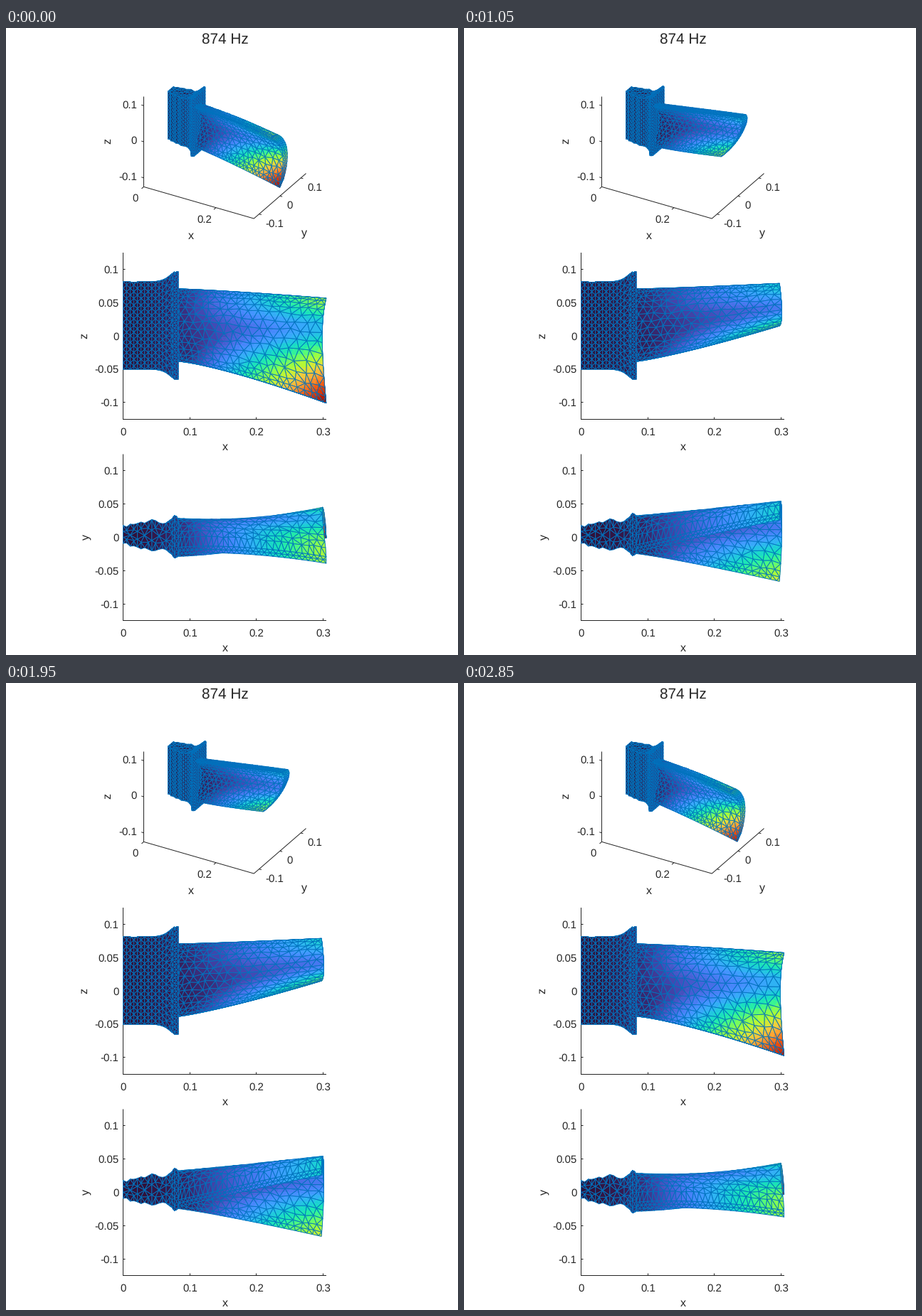
Animation, 635 px wide and 882 px high, one loop 3000 ms. Source, as a matplotlib script:

```python
import numpy as np
import matplotlib.pyplot as plt
from matplotlib.animation import FuncAnimation
from matplotlib.collections import PolyCollection
from matplotlib.tri import Triangulation

W, H, DPI = 635, 882, 100
FRAMES, INTERVAL = 20, 150
INK, EDGE = "#262626", (0, 114 / 255, 189 / 255, 1)
X0, X1 = 0.083, 0.3
rng = np.random.default_rng(7)
turbo = plt.get_cmap("turbo")

plt.rcParams.update({"font.family": "Liberation Sans", "text.hinting": "none"})
fig = plt.figure(figsize=(W / DPI, H / DPI), dpi=DPI, facecolor="white")
ax = fig.add_axes([0, 0, 1, 1])
ax.set_xlim(0, W)
ax.set_ylim(H, 0)
ax.axis("off")


# ---- geometry -------------------------------------------------------------
def blade(t, s, w):
    """Span t, chord s (leading to trailing edge), side w (0 pressure, 1 suction)."""
    hump = 4 * s * (1 - s)
    lead = -0.0175 + 0.036 * t - 0.0115 * t**2
    trail = -0.025 - 0.016 * t
    camber = (1 - w) * 0.03 * hump + w * (0.049 - 0.003 * t) * hump**0.6
    y = lead + (trail - lead) * s + (w - 0.5) * (0.010 - 0.008 * s) + camber
    z = 0.0705 + (-0.109 + 0.0105 * t) * s
    return np.stack([X0 + (X1 - X0) * t, y, z], -1)


def blade_mode(t, s):
    grow, hump = t**1.25, 4 * s * (1 - s)
    bend = 0.0025 * (1 - t) + 0.022 * t * (1 - t) * hump
    dx = grow * (0.0045 - 0.006 * hump)
    dy = -0.041 * grow * np.cos(np.pi * s**0.85) - bend
    dz = -grow * (0.014 + 0.059 * s**2.6)
    return np.stack([dx, dy, dz], -1)


PROFILE_X = [0, 6, 12, 18, 26, 32, 45, 53, 61, 70, 77, 81, 83]
PROFILE_HI = [18, 15.5, 21, 19, 23.5, 21.5, 28.5, 23, 21.5, 25, 34.5, 33, 29]
PROFILE_LO = [-9, -8.5, -14.5, -12, -17.5, -15, -20.5, -17, -15.5, -19, -28.5, -27, -25]


def root(x, v, w):
    """Depth x, height v (bottom to top), side w (front to back)."""
    lo = np.interp(x * 1e3, PROFILE_X, PROFILE_LO) / 1e3
    hi = np.interp(x * 1e3, PROFILE_X, PROFILE_HI) / 1e3
    flare = 0.015 * np.clip((x - 0.049) / 0.0275, 0, 1) ** 2
    z = -0.0505 - flare + (0.132 + 2 * flare) * v
    return np.stack([x + 0 * v, lo + (hi - lo) * w, z], -1)


def root_mode(x):
    zero = 0 * x
    return np.stack([zero, -0.0025 * (x / X0) ** 2, zero], -1)


# ---- meshing --------------------------------------------------------------
def lattice(rows, counts, jitter=0.0, power=1.0):
    """Staggered points (u, v) with counts[i] steps along u on row i."""
    pts = []
    for i, (v, n) in enumerate(zip(rows, counts)):
        u = np.linspace(0, 1, n + 1)
        if i % 2:
            u = np.r_[0, (np.arange(n) + 0.5) / n, 1]
        vv = np.full(len(u), float(v))
        if 0 < i < len(rows) - 1:
            u[1:-1] += rng.uniform(-jitter, jitter, len(u) - 2) / n
            gap = min(v - rows[i - 1], rows[i + 1] - v)
            vv[1:-1] += rng.uniform(-jitter, jitter, len(u) - 2) * gap
        pts.append(np.stack([u**power, vv], -1))
    return np.concatenate(pts).T


patches = []


def add(u, v, size, place, mode, out):
    tris = Triangulation(u * size[0], v * size[1]).triangles
    pos, disp = place(u, v), mode(u, v)
    a, b, c = (pos[tris[:, i]] for i in range(3))
    if np.cross(b - a, c - a).sum(0) @ np.array(out) < 0:
        tris = tris[:, ::-1]
    patches.append((pos[tris], disp[tris]))


def build_blade():
    k = np.linspace(0, 1, 14)
    s_rows = 0.6 * (0.5 - 0.5 * np.cos(np.pi * k)) + 0.4 * k
    counts = (15 + 13 * np.abs(2 * s_rows - 1) ** 4).astype(int)
    for w, out in ((0, (0, -1, 0)), (1, (0, 1, 0))):
        u, v = lattice(s_rows, counts, 0.22, 1.15)
        add(u, v, (203, 130), lambda t, s, w=w: blade(t, s, w), blade_mode, out)
    for s, out in ((0, (0, 0, 1)), (1, (0, 0, -1))):
        u, v = lattice([0, 0.5, 1], [28] * 3, 0, 1.15)
        add(u, v, (203, 9), lambda t, w, s=s: blade(t, s + 0 * t, w),
            lambda t, w, s=s: blade_mode(t, s + 0 * t), out)
    u, v = lattice([0, 0.5, 1], [18] * 3)
    add(u, v, (120, 12), lambda s, w: blade(1 + 0 * s, s, w),
        lambda s, w: blade_mode(1 + 0 * s, s), (1, 0, 0))


def build_root():
    xs = np.r_[np.linspace(0, 0.07, 14), 0.0735, 0.077, 0.080, X0]
    mode = lambda a, x: root_mode(x)
    for w, out in ((0, (0, -1, 0)), (1, (0, 1, 0))):
        u, v = lattice(xs, [13] * 14 + [20] * 4)
        add(u, v, (125, 937), lambda a, x, w=w: root(x, a, w), mode, out)
    for h, out in ((1, (0, 0, 1)), (0, (0, 0, -1))):
        u, v = lattice(xs, [2 + (i % 4 == 0) for i in range(14)] + [5] * 4)
        add(u, v, (30, 937), lambda a, x, h=h: root(x, h + 0 * a, a), mode, out)
    u, v = lattice(np.linspace(0, 1, 7), [18] * 7)
    add(u, v, (150, 55), lambda a, w: root(X0 + 0 * a, a, w),
        lambda a, w: root_mode(X0 + 0 * a), (1, 0, 0))


build_root()
build_blade()
REST = np.concatenate([p for p, _ in patches])
DISP = np.concatenate([d for _, d in patches])
LEVEL = np.sqrt((DISP**2).sum(-1))
LEVEL /= LEVEL.max()


# ---- views ----------------------------------------------------------------
SCALE = 937


class View:
    def __init__(self, matrix, origin, cam):
        self.matrix, self.origin, self.cam = map(np.array, (matrix, origin, cam))
        self.mesh = PolyCollection([], joinstyle="round", zorder=3)
        ax.add_collection(self.mesh, autolim=False)

    def project(self, p):
        return np.asarray(p) @ self.matrix.T + self.origin

    def update(self, pos, level):
        a, b, c = pos[:, 0], pos[:, 1], pos[:, 2]
        seen = np.flatnonzero(np.cross(b - a, c - a) @ self.cam > 0)
        seen = seen[np.argsort(pos[seen].mean(1) @ self.cam)]
        xy, lv = self.project(pos[seen]), level[seen]

        # four flat pieces stand in for a colour blend, then the outline
        def pieces(q):
            a, b, c = q[:, 0], q[:, 1], q[:, 2]
            ab, bc, ca = (a + b) / 2, (b + c) / 2, (c + a) / 2
            parts = ((a, ab, ca), (ab, b, bc), (ca, bc, c), (ab, bc, ca), (a, b, c))
            return np.stack([np.stack(p, 1) for p in parts], 1)

        polys = pieces(xy)
        face = turbo(pieces(lv).mean(2))
        line = face.copy()
        line[:, 4] = EDGE
        width = np.tile([0.4] * 4 + [0.66], (len(seen), 1))
        blend = np.ptp(lv, axis=1) > 0.025
        face[blend, 4, 3] = 0
        keep = np.ones(polys.shape[:2], bool)
        keep[~blend, :4] = False
        self.mesh.set_verts(polys[keep])
        self.mesh.set_facecolor(face[keep])
        self.mesh.set_edgecolor(line[keep])
        self.mesh.set_linewidth(width[keep])


iso = View([[507.5, 293, 0], [146.5, -254, -507.5]], [230.1, 128.2], [0.433, -0.75, 0.5])
side = View([[SCALE, 0, 0], [0, 0, -SCALE]], [164.5, 433], [0, -1, 0])
plan = View([[SCALE, 0, 0], [0, -SCALE, 0]], [164.5, 716.5], [0, 0, 1])


# ---- axes and text --------------------------------------------------------
def stroke(*pts):
    x, y = zip(*pts)
    ax.plot(x, y, color=INK, lw=0.72, zorder=1, solid_capstyle="butt", snap=False)


def label(x, y, text, px=15, ha="center", **kw):
    """Text whose digits are centred on y."""
    ax.text(x, y + 0.36 * px, text, size=px * 72 / DPI, ha=ha, va="baseline",
            color=INK, **kw)


def upright(x, y, text):
    ax.text(x, y, text, size=16 * 72 / DPI, rotation=90, ha="center", va="center",
            color=INK)


def flat_axes(view, name, name_x):
    ox, oy = view.origin
    top, base = oy - 117, np.floor(oy + 117) + 0.5
    stroke((ox, top), (ox, base), (450, base))
    for v in (0.1, 0.05, 0, -0.05, -0.1):
        y = np.floor(oy - SCALE * v) + 0.5
        stroke((ox, y), (ox + 3, y))
        label(158.5, y, f"{v:g}", ha="right")
    for v in (0, 0.1, 0.2, 0.3):
        x = np.floor(ox + SCALE * v) + 0.5
        stroke((x, base), (x, base - 3))
        label(x, base + 16.5, f"{v:g}")
    label(308, base + 38, "x", 16)
    upright(name_x, oy, name)


def iso_axes():
    lim = 0.125
    corners = [(0, -lim, lim), (0, -lim, -lim), (0.305, -lim, -lim), (0.305, lim, -lim)]
    stroke(*iso.project(corners))

    def tick(p, dx, dy):
        x, y = iso.project(p)
        stroke((x, y), (x + dx, y + dy))
        return x, y

    for v in (0, 0.2):
        x, y = tick((v, -lim, -lim), -3, 2.6)
        label(x - 16 + 4.5 * (v == 0), y + 15.5, f"{v:g}")
    for v in (-0.1, 0, 0.1):
        x, y = tick((0.305, v, -lim), 3.2, 0.9)
        label(x + (22 if v < 0 else 20 if v else 14), y + 12.5, f"{v:g}")
        x, y = tick((0, -lim, v), -3.2, -0.9)
        label(184, y - 2, f"{v:g}", ha="right")
    label(260, 291.5, "x", 16)
    label(419, 287, "y", 16)
    upright(143, 159, "z")


label(308, 14, "874 Hz", 20.8)
iso_axes()
flat_axes(side, "z", 110)
flat_axes(plan, "y", 112)


def draw(i):
    amp = np.cos(2 * np.pi * i / FRAMES)
    pos, level = REST + amp * DISP, abs(amp) * LEVEL
    for view in (iso, side, plan):
        view.update(pos, level)
    return iso.mesh, side.mesh, plan.mesh


anim = FuncAnimation(fig, draw, frames=FRAMES, interval=INTERVAL, repeat=True,
                     repeat_delay=0, blit=False)
plt.show()
```
